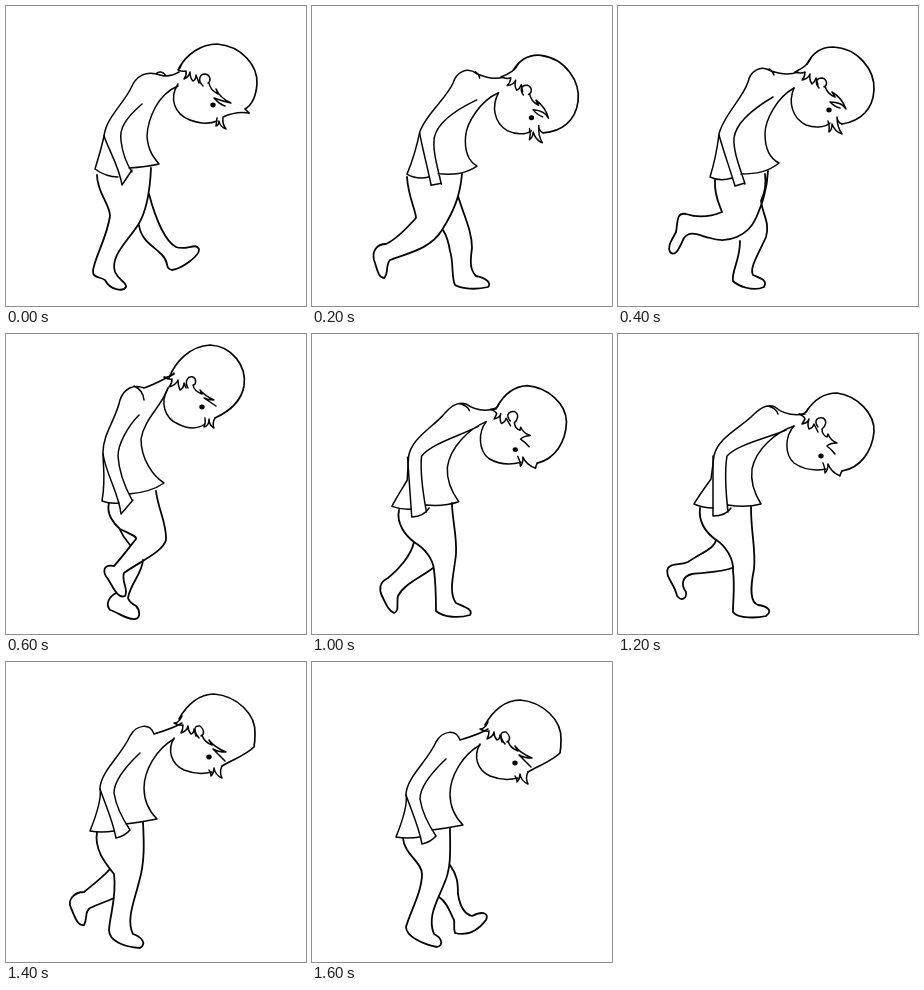
Write an HTML page without scripts that moves like this. It is 300x300 px and loops after 1800 ms.

```html
<!DOCTYPE html>
<html lang="en">
<head>
<meta charset="utf-8">
<title>Walk cycle</title>
<style>
  html, body { margin: 0; width: 100%; height: 100%; overflow: hidden; background: #fff; }
  svg { display: block; width: 100%; height: 100%; }
  path { fill: none; stroke: #050505; stroke-width: 1.5; stroke-linecap: round; stroke-linejoin: round; }
  .legs { stroke-width: 1.8; }
  .skull { stroke-width: 1.7; }
  .pose { visibility: hidden; animation: show 1.8s step-end calc(var(--i) * .2s - 1.8s) infinite; }
  @keyframes show { 0% { visibility: visible; } 11.1111%, 100% { visibility: hidden; } }
</style>
</head>
<body>
<svg viewBox="0 0 300 300">
  <defs>
    <ellipse id="eye" rx="2.7" ry="2.4" fill="#050505"/>

    <g id="lean">
      <path class="skull" d="M189,58 C194,48 203,41 215,41 C240,42 257,64 256,84 C255,103 243,115 224,118"/>
      <path d="M193,52 Q190,60 177,66 Q183,68 187,66 Q187,71 184,74 Q190,73 192,68 Q191,74 194,78 Q197,76 198,72 L200,79 M201,82 C196,76 199,72 204,72 C209,73 210,79 206,81 M207,80 Q209,88 217,91 L214,86 Q224,92 228,103 Q224,96 212,96 Q217,101 222,102 M224,118 Q219,116 219,111 Q219,121 224,128 Q217,126 214,118 Q214,124 211,126 Q212,120 210,115"/>
      <path d="M176,82 C170,96 174,112 188,119 C196,122 206,122 212,117"/>
      <use href="#eye" x="211" y="104"/>
      <path d="M180,66 C169,70 160,67 153,65 C142,58 132,66 130,76 C125,92 105,110 101,128 C99,145 97,155 92,171 Q102,176 114,172 M151,63 Q155,65 156,69"/>
      <path d="M101,129 C106,147 112,163 117,180 L127,177 M155,91 C138,101 118,116 116,132 C115,145 122,162 127,178 M123,168 C138,168 150,166 161,157 C151,152 147,142 147,128 C147,115 158,92 176,82"/>
    </g>

    <g id="stoop">
      <path class="skull" d="M188,78 C195,67 205,59 219,59 C240,62 257,80 256,98 C254,118 242,134 224,137"/>
      <path d="M190,75 Q187,81 181,80 Q186,82 187,85 L184,90 Q190,89 191,85 Q189,91 191,95 Q195,94 196,90 L200,98 M200,93 C195,86 200,83 205,84 C210,87 207,93 204,95 Q204,101 209,103 L210,100 Q212,106 219,109 Q212,109 209,112 Q214,116 217,120 M224,137 Q222,140 222,142 Q213,138 210,130 Q210,136 207,139 Q207,133 205,129"/>
      <path d="M176,92 C167,102 166,120 176,129 C186,136 197,137 208,135"/>
      <use href="#eye" x="203" y="122"/>
      <path d="M187,80 C175,82 165,80 157,73 C148,69 140,76 133,83 C120,95 99,105 96,122 L93,145 C86,155 80,163 76,170 Q85,174 95,174 M150,72 Q158,74 160,80"/>
      <path d="M95,122 Q95,155 95,182 C103,182 109,180 113,174 M168,96 C150,104 120,110 109,122 C106,140 108,160 110,178 M110,171 Q128,174 143,170 C138,162 132,150 134,135 C138,115 158,98 176,92"/>
    </g>

    <g id="stroll">
      <path class="skull" d="M173,63 C181,48 194,38 208,38 C231,40 250,58 249,78 Q249,85 248,91 C240,99 228,103 216,110"/>
      <path d="M176,60 Q173,67 168,67 Q173,70 177,69 Q177,74 175,77 Q181,75 182,70 Q182,75 185,78 Q188,77 188,73 L190,80 M193,82 C187,75 188,69 194,70 C198,73 199,78 195,80 M196,79 Q198,86 206,89 L203,84 Q208,91 220,96 Q212,96 207,93 Q213,99 219,105 M216,110 Q213,116 216,122 Q209,119 208,112 Q208,117 205,120 Q205,116 203,114"/>
      <path d="M168,82 C161,94 165,108 178,114 C188,118 198,118 206,116"/>
      <use href="#eye" x="203" y="101"/>
      <path d="M176,67 C168,72 158,75 148,78 C144,67 131,68 124,80 C115,100 95,115 94,132 C96,142 90,160 84,175 Q95,177 108,175"/>
      <path d="M94,133 C100,150 107,165 110,182 Q119,180 124,174 M134,97 C118,112 108,125 108,137 C110,150 118,165 124,174 M120,168 Q136,166 151,163 C146,158 138,148 138,132 C138,115 150,93 168,83"/>
    </g>
  </defs>

  <g class="pose" style="--i:0">
    <path class="skull" d="M173,62 C181,48 195,38 211,38 C236,40 252,60 251,78 C250,90 246,99 239,103 L243,107"/>
    <path d="M175,59 Q174,63 172,64 Q176,66 180,65 Q181,69 178,73 Q183,71 184,66 Q184,72 187,75 Q190,74 190,69 L193,77 M197,80 C191,74 194,68 199,68 C205,69 205,75 202,77 M203,77 Q204,84 212,88 L210,83 Q214,92 225,97 Q216,95 208,92 Q213,98 219,100 M243,107 Q230,105 217,111 Q216,118 220,123 Q214,121 213,115 Q213,119 210,120 L211,112"/>
    <path d="M172,78 C163,92 168,108 184,114 C195,118 204,118 211,115"/>
    <use href="#eye" x="207" y="99"/>
    <path d="M173,66 C166,70 160,71 154,69 C140,64 130,70 125,82 C118,97 100,112 98,130 C96,140 93,150 89,163 Q100,171 112,171 M151,67 Q156,64 160,70"/>
    <path d="M98,130 C104,147 113,160 116,179 L126,164 M136,98 C120,112 113,122 115,135 C117,150 122,160 126,166 M123,162 Q140,161 153,158 C148,152 142,145 141,130 C142,112 152,88 172,80"/>
    <path class="legs" d="M91,169 C91,187 104,198 104,210 C101,230 92,245 88,260 C84,273 93,270 99,274 C104,284 117,286 120,281 C121,276 113,275 109,266 C104,250 121,236 132,219 C141,205 144,185 145,162 M143,188 C150,215 160,236 170,241 C180,245 190,236 193,243 C194,250 175,263 166,264 C158,262 164,256 156,249 C148,240 135,235 133,219"/>
  </g>

  <g class="pose" style="--i:1">
    <use href="#lean" transform="translate(3 0) rotate(5 125 170)"/>
    <path class="legs" d="M95,171 C96,190 104,205 104,212 C95,222 83,234 74,238 C64,238 60,246 62,254 C65,262 66,272 72,272 C77,268 73,260 78,254 C92,248 118,244 130,224 C142,205 148,190 150,168 M146,190 C152,210 160,225 160,242 C158,256 158,264 164,270 C174,272 180,277 176,281 C164,284 150,283 143,279 C139,270 142,258 138,245 Q136,232 131,224"/>
  </g>

  <g class="pose" style="--i:2">
    <use href="#lean"/>
    <path class="legs" d="M97,174 C96,190 102,200 104,206 C92,211 80,212 68,208 C58,206 60,216 58,226 C54,234 49,240 52,246 C58,252 62,240 66,232 C72,224 80,229 92,232 C110,238 130,230 138,212 C144,198 149,185 150,165 M147,168 Q149,182 143,195 C145,210 152,216 148,231 C141,247 131,262 135,269 C142,272 150,274 146,281 C135,286 120,280 115,275 C113,266 122,255 122,235"/>
  </g>

  <g class="pose" style="--i:3">
    <path class="skull" d="M163,44 C169,28 184,12 204,11 C226,12 241,32 238,52 C235,69 222,78 209,84"/>
    <path d="M168,39 Q164,44 158,43 Q163,46 166,45 Q166,50 163,53 Q170,51 172,46 Q172,52 174,56 Q178,54 178,49 L180,54 M182,54 C178,47 182,42 187,43 C191,45 190,51 187,51 Q188,57 196,60 L194,56 Q199,62 208,66 Q202,66 198,64 Q204,68 210,72 M209,84 Q206,89 208,94 Q203,91 203,85 Q203,92 198,93 Q200,88 199,84"/>
    <path d="M162,54 C154,68 158,84 172,90 C182,95 192,95 199,90"/>
    <use href="#eye" x="196" y="73"/>
    <path d="M168,40 C158,45 150,50 138,54 C128,50 118,54 114,66 C110,85 97,100 97,118 C97,135 100,144 96,167 Q104,170 113,169 M128,52 Q137,56 138,66"/>
    <path d="M97,120 C100,140 113,160 115,180 L127,166 M133,81 C122,92 112,110 112,122 C113,140 120,155 126,166 M123,160 C135,159 148,156 158,149 C147,142 135,125 135,105 C138,85 156,72 162,54"/>
    <path class="legs" d="M103,169 C100,180 108,190 114,195 C124,200 131,202 130,205 C122,215 112,228 108,232 C97,230 96,238 102,245 C108,255 112,265 119,262 C123,255 115,248 118,239 C133,228 157,218 160,206 C161,190 152,175 150,157 M113,194 Q117,203 124,211 M137,226 C136,240 124,250 122,264 M110,259 C103,263 99,270 104,276 C112,278 120,286 129,285 C135,284 134,276 130,272 Q123,268 122,264"/>
  </g>

  <g class="pose" style="--i:4">
    <path class="skull" d="M161,50 C169,35 182,25 199,25 C221,27 234,45 231,67 C229,85 219,102 201,111"/>
    <path d="M166,43 Q161,50 154,49 Q160,54 165,54 Q165,58 161,61 Q168,61 170,56 Q169,62 172,65 Q176,64 176,60 L178,65 M179,65 C174,60 178,56 183,57 C188,60 187,64 184,65 Q190,72 195,72 L194,68 Q203,73 205,84 Q201,78 193,79 M201,111 Q196,107 197,96 Q195,103 191,106 Q193,101 190,99"/>
    <path d="M153,68 C147,82 151,98 166,105 C177,109 186,110 193,104"/>
    <use href="#eye" x="189" y="90"/>
    <path d="M161,56 C148,60 138,62 128,69 C118,58 111,67 108,80 C105,95 91,105 90,123 C90,138 96,150 89,170 Q97,168 106,171 M121,62 Q128,65 126,73"/>
    <path d="M90,123 C95,145 107,160 111,182 L120,174 M130,93 C115,103 106,112 106,125 C107,145 114,160 120,174 M116,165 C130,164 140,160 151,154 C140,145 128,135 129,115 C130,100 148,87 153,69"/>
    <path class="legs" d="M96,170 C93,187 105,200 114,207 C123,211 129,218 129,228 C131,250 134,262 133,278 C145,284 160,285 168,281 C168,274 155,273 148,268 C140,255 152,235 153,215 C154,190 147,180 149,158 M113,207 C108,228 94,240 92,255 C88,265 84,274 91,278 C99,284 112,285 118,280 C118,275 106,273 102,264 C99,250 118,245 129,232"/>
  </g>

  <g class="pose" style="--i:5">
    <use href="#stoop" transform="translate(4 0) rotate(-4 110 172)"/>
    <path class="legs" d="M87,176 C84,190 94,202 102,208 C99,222 86,236 76,244 C67,248 67,256 70,262 C74,270 76,276 82,279 C88,277 84,269 86,262 C92,250 108,244 121,234 M102,208 C112,214 121,224 122,236 C124,252 124,264 124,277 C132,284 148,284 158,281 C162,275 150,272 144,269 C136,258 142,240 144,220 C145,200 140,185 140,169"/>
  </g>

  <g class="pose" style="--i:6">
    <use href="#stoop"/>
    <path class="legs" d="M82,174 C80,190 90,200 98,206 C97,214 85,218 70,228 C62,232 55,228 50,234 C46,242 57,250 59,262 C64,268 69,264 68,258 C62,250 65,242 74,240 C90,238 105,238 114,234 M97,205 C108,212 116,225 115,237 C117,252 115,265 115,278 C120,285 140,284 148,282 C156,276 148,272 140,271 C132,268 132,255 136,235 C138,215 133,200 133,173"/>
  </g>

  <g class="pose" style="--i:7">
    <use href="#stroll" y="-6"/>
    <path class="legs" d="M91,170 C88,188 100,202 108,212 C111,235 104,252 103,268 C103,279 118,285 134,286 C141,282 136,275 127,272 C120,258 128,240 133,220 C139,200 138,180 137,160 M104,207 C98,214 88,222 78,230 C68,230 61,238 65,246 C69,256 72,264 78,263 C82,256 78,250 84,246 C92,242 100,240 108,236"/>
  </g>

  <g class="pose" style="--i:8">
    <use href="#stroll"/>
    <path class="legs" d="M91,176 C92,192 110,200 110,212 C110,230 98,250 94,265 C94,274 110,282 125,285 C132,283 130,276 122,272 C115,255 125,240 132,222 C140,205 138,185 138,166 M138,203 C145,213 146,220 146,232 C148,245 152,252 160,254 C172,248 177,252 174,258 C165,270 155,274 143,271 C141,265 143,262 142,258 C138,250 135,240 127,235"/>
  </g>
</svg>
</body>
</html>
```
